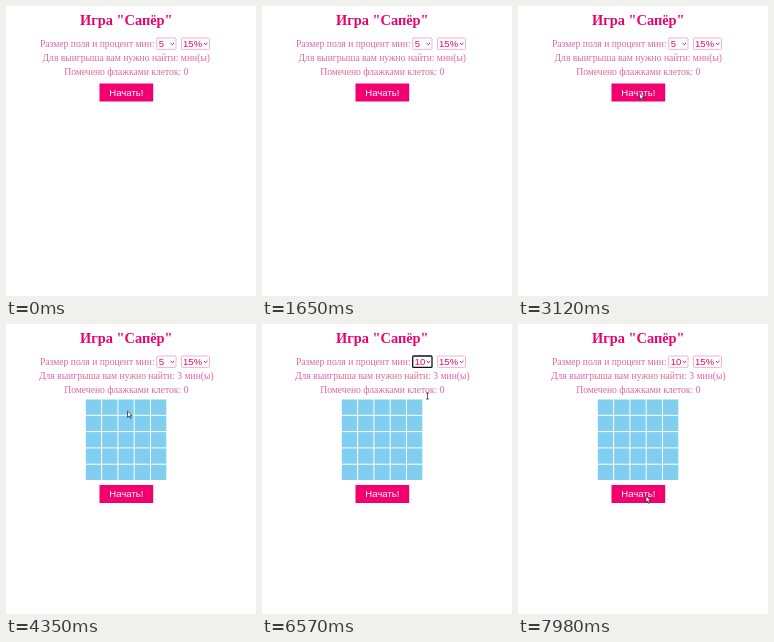
These frames come from a looping animation (250x290 px, 8 s). An HTML page:

```html
<!DOCTYPE html>
<html lang="ru">
<head>
<meta charset="utf-8">
<style>
  html, body { margin: 0; width: 100%; height: 100%; overflow: hidden; background: #fff; }
  svg { display: block; width: 250px; height: 290px; }
  text { font: 9.6px "Liberation Serif", "Times New Roman", serif; fill: #e0679e; }
  .mid { text-anchor: middle; }
  .title { font-size: 14.4px; font-weight: bold; fill: #e8046f; }
  .ui { font-family: "Liberation Sans", Arial, sans-serif; fill: #e8046f; }
  .box { fill: #fff; stroke: #e39abb; stroke-width: .7; }
  .focused { stroke: #111; stroke-width: 1.3; }
  .arrow { fill: none; stroke: #e8046f; stroke-width: 1; }
  #button rect { fill: #f2006f; }
  #button text { fill: #fff; }
  #grid { fill: #80cff0; }
</style>
</head>
<body>
<svg viewBox="0 0 250 290">
  <text class="mid title" x="120.3" y="19">Игра "Сапёр"</text>
  <text x="34" y="41">Размер поля и процент мин:</text>
  <rect id="sizeBox" class="box" x="150.7" y="32" width="19.3" height="11.4" rx="1"/>
  <text id="size" class="ui" x="152.7" y="41.2">5</text>
  <path class="arrow" d="M164.6 37l1.7 1.7 1.7-1.7"/>
  <rect class="box" x="175.5" y="32" width="28" height="11.4" rx="1"/>
  <text class="ui" x="177" y="41.2">15%</text>
  <path class="arrow" d="M198 37l1.7 1.7 1.7-1.7"/>
  <text id="goal" class="mid" x="120.3" y="55"></text>
  <text class="mid" x="120.3" y="69">Помечено флажками клеток: 0</text>
  <g id="grid"></g>
  <g id="button">
    <rect x="93.5" y="77.5" width="53.7" height="18"/>
    <text class="mid ui" x="120.4" y="89.6">Начать!</text>
  </g>
  <g id="cursor">
    <path id="pointer" d="M0 0v6.3l1.5-1.3 1.1 2.4 1.1-.5-1-2.3h2z" fill="#fff" stroke="#222" stroke-width=".7"/>
    <path id="beam" d="M-1.4-3h2.8M0-3v6M-1.4 3h2.8" fill="none" stroke="#333" stroke-width=".8"/>
  </g>
</svg>
<script>
const $ = id => document.getElementById(id);
const LOOP = 8000, START = 3600, PICK = 6540, RESTART = 7900;

// Cursor stops: time, x, y
const stops = [
  [1700, 251, 205], [2130, 125, 74], [2500, 121.5, 87], [4400, 121.5, 87],
  [4880, 160, 39], [5400, 162, 38], [5950, 161, 70], [6540, 165.5, 72],
  [7250, 165.5, 72], [7720, 128, 172], [LOOP, 128, 172]
];

const PITCH = 16.3, CELL = 15.3;
for (let i = 0; i < 25; i++) {
  const cell = document.createElementNS("http://www.w3.org/2000/svg", "rect");
  cell.setAttribute("x", 79.8 + i % 5 * PITCH);
  cell.setAttribute("y", 75.5 + Math.floor(i / 5) * PITCH);
  cell.setAttribute("width", CELL);
  cell.setAttribute("height", CELL);
  $("grid").append(cell);
}

const show = (id, on) => $(id).setAttribute("visibility", on ? "visible" : "hidden");

function cursorAt(t) {
  const i = Math.max(1, stops.findIndex(s => s[0] > t));
  const [t0, x0, y0] = stops[i - 1], [t1, x1, y1] = stops[i];
  const p = (t - t0) / (t1 - t0), e = p * p * (3 - 2 * p);
  return [x0 + (x1 - x0) * e, y0 + (y1 - y0) * e];
}

function draw(now) {
  const t = now % LOOP;
  const started = t >= START, picked = t >= PICK;
  show("grid", started);
  $("button").setAttribute("transform", `translate(0 ${started ? 83.5 : 0})`);
  $("goal").textContent = `Для выигрыша вам нужно найти: ${started ? "3 " : ""}мин(ы)`;
  $("size").textContent = picked ? 10 : 5;
  $("sizeBox").classList.toggle("focused", picked && t < RESTART);

  const visible = t >= stops[0][0], overText = picked && t < 7300;
  show("pointer", visible && !overText);
  show("beam", visible && overText);
  if (visible) $("cursor").setAttribute("transform", `translate(${cursorAt(t)})`);
}

const begin = performance.now();
(function tick() {
  draw(performance.now() - begin);
  requestAnimationFrame(tick);
})();
</script>
</body>
</html>
```
